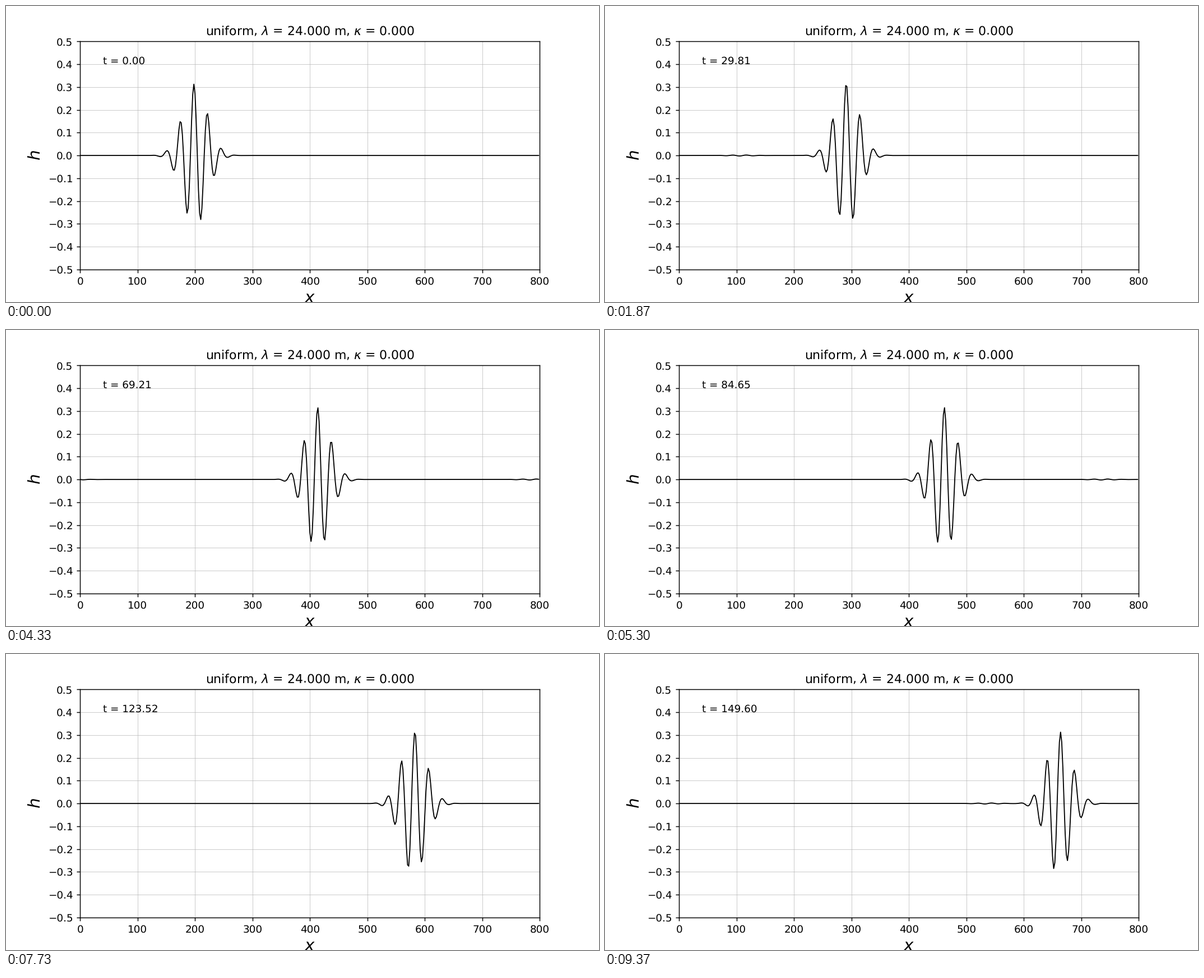
Recreate the animation shown at these times as a matplotlib script. Size 1058 by 529 pixels, loop 9410 ms.

```python
import numpy as np
import matplotlib.pyplot as plt
from matplotlib.animation import FuncAnimation

STEPS = 282
FRAMES = STEPS + 1       # the last step is held a little longer
LOOP_MS = 9410
DT = 0.532397            # model time per step

# Periodic domain and initial wave packet
LENGTH, N = 800, 400
WAVELENGTH, CENTRE, WIDTH = 24, 200, 30
AMPLITUDE = np.pi / 10
SPEED = np.sqrt(9.81)    # long-wave speed for unit depth
PHASE_LAG = 0.00487      # relative slowdown at the carrier wavenumber
REFLECTED = 0.007        # share that leaves to the left, inverted

x = np.arange(N) * LENGTH / N
k0 = 2 * np.pi / WAVELENGTH
packet = AMPLITUDE * np.exp(-((x - CENTRE) / WIDTH) ** 2) * np.sin(k0 * x)
spectrum = np.fft.rfft(packet)
k = 2 * np.pi * np.fft.rfftfreq(N, LENGTH / N)
omega = SPEED * k * (1 - PHASE_LAG * (k / k0) ** 2)


def height(t):
    """Surface height of the right-going packet plus its faint reflection."""
    turn = np.exp(-1j * omega * t)
    mix = (1 + REFLECTED) * turn - REFLECTED * turn.conj()
    return np.fft.irfft(spectrum * mix, N)


plt.rcParams["font.family"] = "DejaVu Sans"
plt.rcParams["text.hinting"] = "no_hinting"
fig, ax = plt.subplots(figsize=(8, 4), dpi=132.25)
ax.set_xlim(0, LENGTH)
ax.set_ylim(-0.5, 0.5)
ax.set_yticks(np.linspace(-0.5, 0.5, 11))
ax.grid(linewidth=0.5, alpha=0.7)
ax.set_title(r"uniform, $\lambda$ = 24.000 m, $\kappa$ = 0.000")
ax.set_xlabel("$x$", fontsize=16)
ax.set_ylabel("$h$", fontsize=16)

line, = ax.plot(x, packet, color="black", linewidth=1)
clock = ax.text(0.05, 0.9, "", transform=ax.transAxes)


def update(i):
    t = min(i, STEPS - 1) * DT
    line.set_ydata(height(t))
    clock.set_text(f"t = {t:.2f}")
    return line, clock


anim = FuncAnimation(fig, update, frames=FRAMES, interval=LOOP_MS / FRAMES,
                     repeat=True, repeat_delay=0)
plt.show()
```
